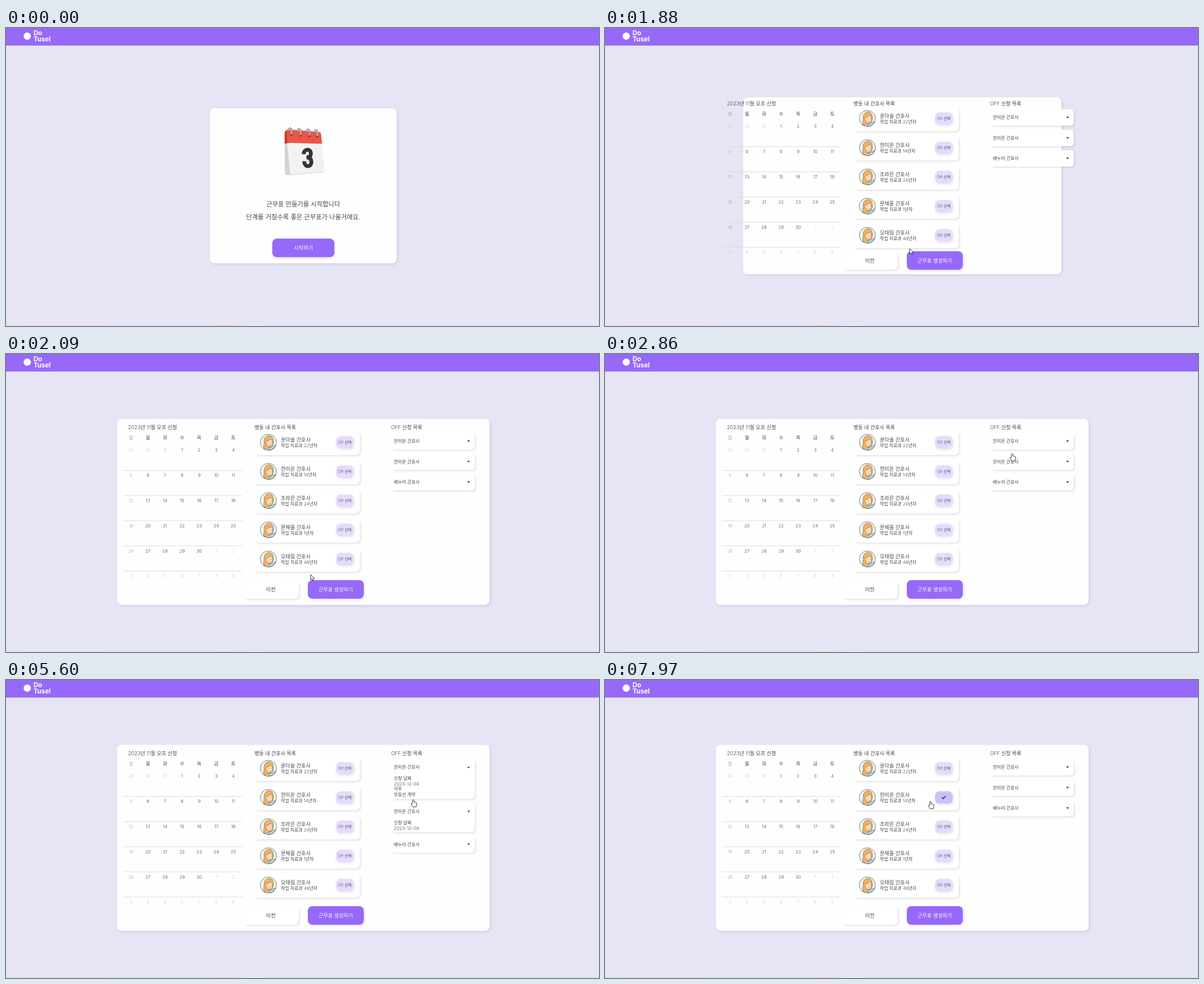
Animation, 1055 px wide and 531 px high, one loop 8 s. Source, as an HTML page:

```html
<!DOCTYPE html>
<html lang="ko">
<head>
<meta charset="utf-8">
<title>근무표 만들기</title>
<style>
html, body { margin: 0; width: 100%; height: 100%; overflow: hidden; background: #e6e5f5; }
svg { display: block; }
text { font-family: Inter, "Noto Sans CJK KR", "Noto Sans CJK", sans-serif; font-weight: 300; white-space: pre; }
.pop { filter: drop-shadow(2px 2px 2px rgba(60, 50, 110, .12)); }
.card { fill: #fff; filter: drop-shadow(2px 2.5px 1.5px rgba(0, 0, 0, .1)); }
.pill { filter: drop-shadow(1px 2px 2px rgba(120, 90, 220, .2)); }
</style>
</head>
<body>
<svg id="stage" width="1055" height="531" viewBox="0 0 1055 531"></svg>
<script>
const LOOP = 8000, PURPLE = '#9669f9', INK = '#444';
const stage = document.getElementById('stage');

// y is the middle of the line
const txt = (x, y, s, size, fill = INK, anchor = 'start', extra = '') =>
  `<text x="${x}" y="${y + size * 0.37}" font-size="${size}" fill="${fill}" text-anchor="${anchor}" ${extra}>${s}</text>`;
const mid = (x, y, s, size, fill) => txt(x, y, s, size, fill, 'middle');
const box = (x, y, w, h, r, attrs) =>
  `<rect x="${x}" y="${y}" width="${w}" height="${h}" rx="${r}" ${attrs}/>`;

function header() {
  return `<rect width="1055" height="31.3" fill="${PURPLE}"/><circle cx="37.8" cy="14.5" r="6.5" fill="#fff"/>` +
    txt(49, 9.2, 'Do', 11.5, '#fff', 'start', 'style="font-weight:700"') +
    txt(49, 19.4, 'Tusel', 11.5, '#fff', 'start', 'style="font-weight:700"') +
    '<path d="M0 530.5H1055" stroke="#dfe2ee"/><path d="M24 530.5H185" stroke="#e6d9de"/>' +
    '<path d="M373 530.5H402" stroke="#f3cdbd"/><path d="M428 530.5H457" stroke="#f0f0f6"/>';
}

function calendarIcon() {
  const rings = [506, 522, 538, 552].map((x, i) => {
    const y = 180 + i;
    return `<ellipse cx="${x + 2}" cy="${y + 10.5}" rx="2.6" ry="2" fill="#a8352c"/>
      <path d="M${x + 2} ${y + 10}C${x + 5} ${y - 3} ${x - 4} ${y - 4} ${x - 3} ${y + 4}" fill="none" stroke="#8c8c8c" stroke-width="3"/>
      <path d="M${x + 1.5} ${y + 9}C${x + 4} ${y - 2} ${x - 3} ${y - 3} ${x - 2.6} ${y + 3}" fill="none" stroke="#d5d5d5" stroke-width="1.2"/>`;
  }).join('');
  return `<path d="M495.8 205L500 204L508 262L500 262Q496.500 262 496 258Z" fill="#d3d4d6"/>
    <path d="M500.500 203L562 206L567 252Q567.300 255.500 564 256.200L509 262Q505.500 262 505 259Z" fill="#f1f2f3"/>
    <path d="M505 259Q505.500 262 509 262L564 256.200" fill="none" stroke="#cfd0d2"/>
    <path d="M495.700 206V187Q496 183 500 182L504 205Z" fill="#c9372c"/>
    <path d="M499 184Q499 180.500 503 180.800L556 185Q560 185.500 560.400 188L562.300 206.300L500.800 204.500Z" fill="#ea5548"/>
    ${rings}
    <path d="M529.800 225C529.500 214.500 542.500 214.500 542.300 223.500C542.200 228.500 540 230.700 534.500 230.700C541 230.700 543.300 234 543.300 239C543 249 530.500 248.500 530.500 237.500" fill="none" stroke="#343434" stroke-width="6.800"/>`;
}

function intro() {
  return calendarIcon() +
    mid(528.8, 314, '근무표 만들기를 시작합니다', 11.3) +
    mid(528.8, 336.5, '단계를 거칠수록 좋은 근무표가 나올거에요.', 11.3) +
    box(473.7, 375.3, 110.5, 33, 8, `fill="${PURPLE}" class="pill"`) +
    mid(529, 391.8, '시작하기', 9.2, '#fff');
}

function month() {
  const orange = '#e39058';
  let out = txt(217, 131, '2023년 11월 오프 신청', 9.1);
  [...'일월화수목금토'].forEach((d, i) => out += mid(222.3 + i * 30.35, 149, d, 8.4, i ? INK : orange));
  for (let i = 0; i < 42; i++) {
    const n = i - 2, day = n < 1 ? 31 + n : n > 30 ? n - 30 : n;
    const fill = n < 1 || n > 30 ? '#cacaca' : i % 7 ? INK : orange;
    out += mid(222.3 + (i % 7) * 30.35, 171.3 + Math.floor(i / 7) * 44.85, day, 7.7, fill);
  }
  for (let r = 0; r < 5; r++) out += `<path d="M208 ${207.5 + r * 44.8}h212" stroke="#dcdcdf"/>`;
  return out;
}

const avatar = `<circle r="14.3" fill="#f0f7fb"/>
  <g stroke="#8a5a35" stroke-width=".7">
  <path d="M-1 14Q1 9 6 8L13 5Q12 11 5 13.500Z" fill="#a9e3e6"/>
  <path d="M-8 12Q-9 7 -7.500 2Q-9 -9 -1 -11.500Q8 -13 9 -3Q9.500 3 7 6L-3 12Z" fill="#f0b35f"/>
  <path d="M-3 -2Q2 -3 4 -6Q8 -3 7.500 2Q7 8 2 8Q-2 8 -3 3Q-5 2 -4.500 0Z" fill="#fde0c4"/>
  <path d="M.5 0v1.500M5 0v1.500M1.500 4.500q2 1.500 3.500 0" fill="none"/></g>
  <circle r="14.300" fill="none" stroke="#4a5a68" stroke-width=".8"/>`;

const nurses = [['윤다솔', 22], ['한미온', 14], ['조라은', 24], ['문채울', 1], ['오태림', 48]];

function nurseRow([name, years], i) {
  const y = i * 52, pick = i === 1;
  return box(442, 138 + y, 187.5, 42, 7, 'class="card"') +
    `<g transform="translate(466.800 ${157.3 + y})">${avatar}</g>` +
    txt(489, 152.3 + y, name + ' 간호사', 9.1) +
    txt(489, 163.3 + y, `작업 치료과 ${years}년차`, 7.9) +
    box(587, 146.3 + y, 31.6, 22, 8, `fill="#e5dcfd" class="pill" ${pick ? 'id="pick"' : ''}`) +
    `<g ${pick ? 'id="label"' : ''}>${mid(602.7, 157.2 + y, 'Off 선택', 6.9, '#5a5560')}</g>`;
}

function request(name, i) {
  return `<g id="req${i}"><rect id="pad${i}" x="685" y="141" width="149" height="29" rx="6" class="card"/>` +
    txt(690, 155.3, name + ' 간호사', 7.9) +
    `<path id="tri${i}" d="M-2.600 -1.300H2.600L0 1.400Z" fill="#333"/>
    <svg id="more${i}" x="685" y="168" width="149" height="0" overflow="hidden">` +
    txt(5, 7.5, '신청 날짜', 7.9) + txt(5, 17.5, '2023-12-04', 8) +
    txt(5, 25.3, '사유', 7.9) + txt(5, 36.3, '부동산 계약', 7.9) + '</svg></g>';
}

function planner() {
  return `<g id="body">${month()}${txt(442, 131, '병동 내 간호사 목록', 9)}${nurses.map(nurseRow).join('')}
    <path id="check" d="M599.300 209.300l2.300 2.300l4.400 -4.600" fill="none" stroke="#222" stroke-width="1.400"/>
    ${txt(685, 131, 'OFF 신청 목록', 9)}${['한미온', '한미온', '배누리'].map(request).join('')}</g>
    <g id="foot">${box(422, 403, 99, 33, 8, 'class="card"')}${mid(471, 419.5, '이전', 9.3)}
    ${box(537, 403, 99.6, 33, 8, `fill="${PURPLE}" class="pill"`)}${mid(586.7, 419.5, '근무표 생성하기', 9.1, '#fff')}</g>`;
}

stage.innerHTML = header() + '<rect id="pop" rx="8" fill="#fefefe" class="pop"/>' +
  `<g id="intro">${intro()}</g><g id="planner">${planner()}</g>
  <g id="cursor" fill="#fff" stroke="#222" stroke-width=".9" stroke-linejoin="round">
  <path id="arrow" d="M0 0V9.500L2.200 7.600L3.700 11L5.300 10.300L3.900 7H6.800Z"/>
  <path id="hand" d="M-1.300 7.500V1.300Q0 -.5 1.200 1.300V5Q2.400 4.200 3.200 5.300Q4.500 4.700 5 6Q6.200 5.700 6.200 7.200V9.500Q6 11.500 5 13.500H-.8Q-1.800 11.500 -3.800 8.800Q-4.200 7 -2.600 7Z"/></g>`;
const $ = id => document.getElementById(id);
const set = (id, attrs) => { for (const k in attrs) $(id).setAttribute(k, attrs[k]); };
const show = (id, on) => set(id, { visibility: on ? 'visible' : 'hidden' });
const clamp = v => Math.min(1, Math.max(0, v));

function bezier(x1, y1, x2, y2) {
  const at = (a, b, u) => 3 * a * u * (1 - u) ** 2 + 3 * b * u * u * (1 - u) + u ** 3;
  return x => {
    let lo = 0, hi = 1;
    for (let i = 0; i < 20; i++) {
      const m = (lo + hi) / 2;
      if (at(x1, x2, m) < x) lo = m; else hi = m;
    }
    return at(y1, y2, lo);
  };
}
const ease = bezier(0.25, 0.1, 0.25, 1), material = bezier(0.4, 0, 0.2, 1);
const ramp = (t, start, len, curve) => t <= start ? 0 : t >= start + len ? 1 : curve((t - start) / len);

// first step, last step, number of steps, x, y, power
const moves = [
  [590, 880, 5, 550, 404, 1],
  [1340, 1480, 3, 542, 393, 2],
  [2370, 2860, 8, 724.5, 177, 1.2],
  [2930, 3140, 4, 732.5, 150, 1],
  [3210, 3350, 3, 741, 156, 1],
  [3900, 3900, 1, 741, 157, 1],
  [4170, 4310, 3, 721.5, 221, 1],
  [4380, 4450, 2, 722, 227, 1],
  [5600, 5880, 5, 735, 155, 1],
  [6300, 6440, 3, 655, 148, 1],
  [6510, 6580, 2, 596, 160, 1],
  [6780, 7200, 7, 606, 207, 2],
  [7620, 7970, 6, 579, 216, 1]
];

function pointer(t) {
  let x = 626, y = 545;
  for (const [a, b, n, tx, ty, pow] of moves) {
    if (t < a) break;
    const k = n === 1 ? 0 : Math.floor((t - a) / (b - a) * (n - 1) + 0.01);
    const p = clamp((k + 1) / n) ** pow;
    x += (tx - x) * p;
    y += (ty - y) * p;
  }
  return [x, y];
}

function drawRequests(t) {
  const open = [
    ramp(t, 3390, 300, material) - ramp(t, 6130, 300, material),
    ramp(t, 4490, 300, material) - ramp(t, 5500, 300, material),
    0
  ];
  let y = 0;
  open.forEach((p, i) => {
    set('req' + i, { transform: `translate(0 ${y})` });
    set('pad' + i, { height: 29 + 42 * p });
    set('more' + i, { height: 42 * p });
    set('tri' + i, { transform: `translate(823 155.300) rotate(${180 * p})` });
    y += 36.5 + 42 * p;
  });
}

function draw(t) {
  const second = t >= 1750;
  const p = second ? ramp(t, 1714, 400, ease) : 0;
  const w = 332 + 331 * p, h = 276.3 + 55.2 * p;
  set('pop', { x: 529 - w / 2, y: 281.2 - h / 2, width: w, height: h });
  $('intro').style.display = second ? 'none' : '';
  $('planner').style.display = second ? '' : 'none';
  set('body', { transform: `translate(0 ${13.6 * (1 - p)})` });
  set('foot', { transform: `translate(0 ${-18 * (1 - p)})` });
  drawRequests(t);

  const picked = ramp(t, 7270, 250, ease);
  const mix = (a, b) => Math.round(a + (b - a) * picked);
  set('pick', { fill: `rgb(${mix(229, 207)},${mix(220, 190)},${mix(253, 252)})` });
  set('label', { opacity: picked > 0 ? 0 : 1 });
  set('check', { opacity: picked > 0 ? 1 : 0 });

  const [x, y] = pointer(t);
  const hot = second
    ? x > 684 && y > 140 || x > 442 && x < 630 && y < 388
    : x > 474 && x < 584 && y > 375 && y < 409;
  set('cursor', { transform: `translate(${x} ${y})` });
  show('hand', hot);
  show('arrow', !hot);
}

const begin = performance.now();
function tick() {
  draw((performance.now() - begin) % LOOP);
  requestAnimationFrame(tick);
}
tick();
</script>
</body>
</html>
```
